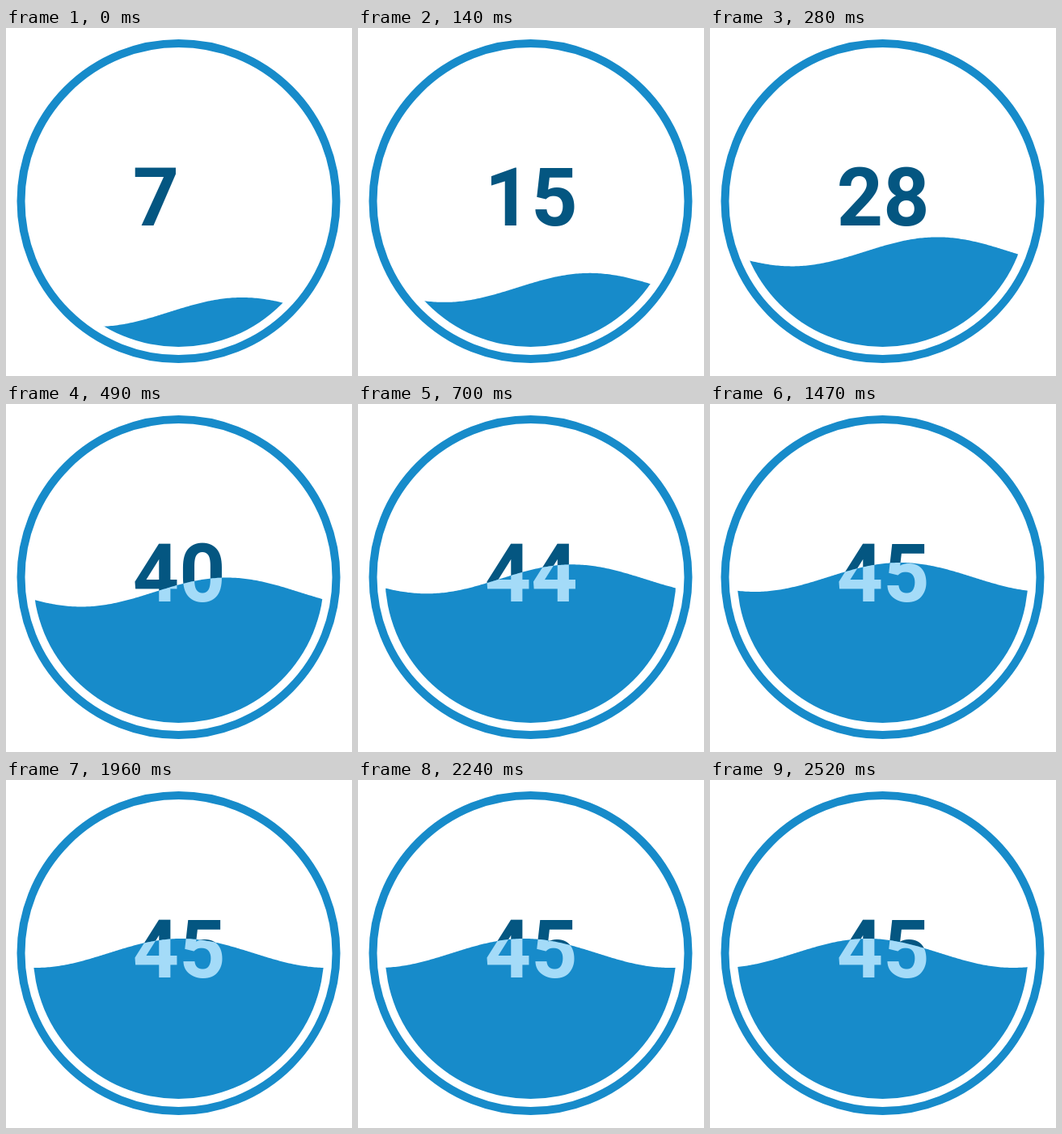
Recreate the animation shown at these times as an HTML page with a canvas. Size 428 px wide and 430 px high, loop 2.59 s.

```html
<!DOCTYPE html>
<html lang="en">
<head>
<meta charset="utf-8">
<title>Liquid gauge</title>
<style>
  html, body { margin: 0; width: 100%; height: 100%; overflow: hidden; background: #fff; }
  canvas { display: block; }
</style>
</head>
<body>
<canvas id="stage" width="428" height="430"></canvas>
<script>
const ctx = document.getElementById('stage').getContext('2d');
const WIDTH = 428, HEIGHT = 430;
const LOOP = 2590, STEP = 70;
const CENTER = { x: 213.5, y: 214 };
const FILL_RADIUS = 180, AMPLITUDE = 18, WAVELENGTH = 360;
const TARGET = 45, RISE_TIME = 1375, RISE_START = 0.338;
const BLUE = '#178bca', DARK = '#045681', LIGHT = '#a4dbf8';

function easeInOutCubic(x) {
  return x < 0.5 ? 4 * x ** 3 : 1 - 4 * (1 - x) ** 3;
}

function circle(radius) {
  ctx.beginPath();
  ctx.arc(CENTER.x, CENTER.y, radius, 0, Math.PI * 2);
}

function wavePath(level, crest) {
  ctx.beginPath();
  ctx.moveTo(0, HEIGHT);
  for (let x = 0; x <= WIDTH; x += 2) {
    ctx.lineTo(x, level - AMPLITUDE * Math.cos((x - crest) / WAVELENGTH * Math.PI * 2));
  }
  ctx.lineTo(WIDTH, HEIGHT);
  ctx.closePath();
}

function label(text, color) {
  ctx.fillStyle = color;
  ctx.fillText(text, 156.8, 244);
}

function draw(t) {
  const progress = easeInOutCubic(Math.min(1, RISE_START + t / RISE_TIME));
  const value = TARGET * progress;
  const level = 376 - 3.6 * value;
  const crest = 292 - 0.0385 * t;
  const text = String(Math.round(value));

  ctx.fillStyle = '#fff';
  ctx.fillRect(0, 0, WIDTH, HEIGHT);

  circle(195);
  ctx.lineWidth = 10;
  ctx.strokeStyle = BLUE;
  ctx.stroke();

  ctx.font = 'bold 100px Roboto, sans-serif';
  label(text, DARK);

  ctx.save();
  wavePath(level, crest);
  ctx.clip();
  circle(FILL_RADIUS);
  ctx.fillStyle = BLUE;
  ctx.fill();
  label(text, LIGHT);
  ctx.restore();
}

let start = null;
function tick(now) {
  if (start === null) start = now;
  const t = (now - start) % LOOP;
  draw(Math.floor(t / STEP) * STEP);
  requestAnimationFrame(tick);
}
draw(0);
requestAnimationFrame(tick);
</script>
</body>
</html>
```
